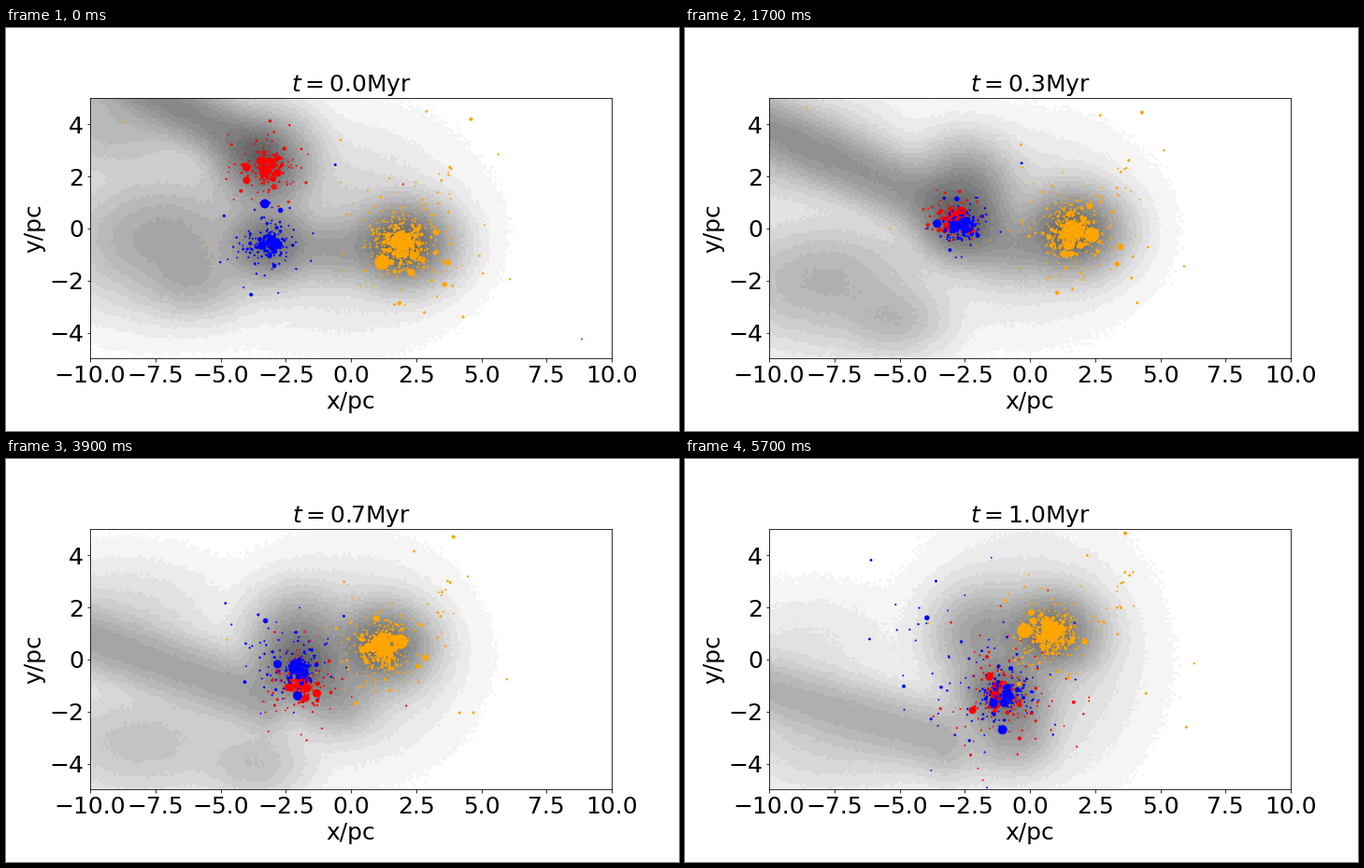
These frames come from a looping animation (720x432 px, 5.8 s). A matplotlib script:

```python
import numpy as np
import matplotlib.pyplot as plt
from matplotlib.animation import FuncAnimation

FRAMES = 58
rng = np.random.default_rng(12)

plt.rcParams.update({"font.family": "DejaVu Sans", "font.size": 25,
                     "axes.titlesize": 25})


def mix(a, b, u):
    return a + (b - a) * u


def path(u, start, *rest):
    """Straight line, or a parabola through start, middle and end."""
    a, b = np.array(start, float), np.array(rest[-1], float)
    p = mix(a, b, u)
    if len(rest) == 2:
        p = p + 4 * u * (1 - u) * (np.array(rest[0]) - (a + b) / 2)
    return p


# Cluster centres: two on a decaying mutual orbit, one drifting by itself
def pair(u, side):
    swing, angle = 1.45 * np.exp(-2.5 * u), 4.76 * u
    x = -3.15 + u + 1.15 * u * u - side * .35 * swing * np.sin(angle)
    y = .85 - 2.15 * u + side * swing * np.cos(angle)
    return np.array([x, y])


def north(u):
    return pair(u, 1)


def south(u):
    return pair(u, -1)


def east(u):
    return path(u, (2, -.6), (.8, 1))


# Gas: Gaussian clouds plus one long arm, joined by a soft maximum
GX, GY = np.meshgrid(np.linspace(-9.95, 9.95, 200), np.linspace(-4.95, 4.95, 100))


def cloud(centre, width, depth):
    x, y = centre
    return depth * np.exp(-((GX - x) / width[0]) ** 2 / 2 - ((GY - y) / width[1]) ** 2 / 2)


def arm(u):
    left = 6.6 - 10 * u + 2.2 * u * u
    right = 3.2 - 7.5 * u + 1.4 * u * u
    ridge = mix(left, right, (GX + 10) / 6)
    taper = np.maximum(GX + 3.5, 0)
    return mix(.76, .52, u) * np.exp(-((GY - ridge) / 1.25) ** 2 / 2 - taper ** 2 / 2)


def gas_image(f):
    u = f / (FRAMES - 1)
    parts = [
        arm(u),
        cloud(east(u), (1.6, 1.35), mix(1, .9, u)),
        cloud(south(u), (1.45, 1.25), .9),
        cloud(path(u, (-3.3, 2.5), (-2.2, .9), (-1.8, .9)), (1.65, 1.6), mix(.88, .64, u)),
        cloud(path(u, (-.6, -.8), (-.6, -1), (-.5, -2.7)), path(u, (1.8, 1.1), (1.3, 1.3)), .6),
        cloud(path(u, (-.4, 0), (0, 0)), path(u, (3.4, 2.8), (3.1, 2.6), (3, 3.4)), .35),
        cloud(path(u, (-7.2, -.4), (-8, -2.8), (-7.5, -3.2)),
              path(u, (3.2, 2.1), (3.6, 1.7)), mix(.6, .32, u)),
        cloud(path(u, (-6, -2), (-4.5, -4), (-2, -3.2)), (1.8, 1.2), mix(.5, .4, u)),
        cloud(path(u, (-9, 4), (-8.5, .5)), (3, 1.8), mix(.48, .2, u)),
    ]
    depth = np.cbrt(sum(p ** 3 for p in parts))
    noise = np.random.default_rng(100 + f).normal(0, .005, GX.shape)
    return 255 - 10 * np.clip(np.floor((depth + noise) * 16), 0, 16)


class Cluster:
    """Stars orbiting a moving centre; some are flung out after the encounter."""

    def __init__(self, color, count, scale, centre, breathe, kick=(0, 0), flung=0):
        self.color, self.centre, self.breathe = color, centre, breathe
        r = scale / np.sqrt(rng.uniform(.01, .95, count) ** (-2 / 3) - 1)
        size = np.clip(1.8 * rng.uniform(.002, 1, count) ** -.33, 0, 9)
        self.r = r * np.where(size > 5, .5, 1)
        self.phase, self.tilt = rng.uniform(0, 2 * np.pi, (2, count))
        self.flat = rng.uniform(.35, 1, count)
        self.rate = 3.4 / (self.r + .3) * rng.choice([-1, 1], count)
        loose = (rng.random(count) < flung) & (size < 4)
        self.kick = (rng.normal(0, 1.7, (count, 2)) + kick) * loose[:, None]
        self.sizes = list(size ** 2)
        self.solo = []

    def add(self, diameter, *points):
        self.solo.append(points)
        self.sizes.append(diameter ** 2)

    def positions(self, f):
        t = f / (FRAMES - 1)
        a = self.phase + self.rate * t
        r = self.r * self.breathe(t)
        u, v = r * np.cos(a), r * self.flat * np.sin(a)
        c, s = np.cos(self.tilt), np.sin(self.tilt)
        swarm = self.centre(t) + np.column_stack([u * c - v * s, u * s + v * c])
        swarm += self.kick * max(0, (t - .35) / .65)
        return np.vstack([swarm] + [path(t, *p) for p in self.solo])


def squeeze(u):
    return 1 + .3 * u - .55 * np.sin(np.pi * u)


red = Cluster("red", 180, .5, north, squeeze, (.3, -.6), .25)
red.add(9, (-4, 2.35), (-1.6, -1), (-1.55, -.65))
red.add(8, (-4, 1.85), (-1.9, -.9), (-2.2, -1.95))
red.add(12, (-3.3, 2.2), (-2.2, -.2), (-1.3, -1.4))
red.add(2.2, (2, 1.7), (2.2, -.85), (1.8, -3.35))
red.add(2, (8.85, -4.25), (10, -9))

blue = Cluster("blue", 190, .45, south, squeeze, (-1.8, .5), .25)
blue.add(10, (-3.3, .95), (-2.5, -.7), (-1.05, -2.7))
blue.add(9, (-3.4, -.65), (-3.3, .2), (-1.4, -1.7))
blue.add(12, (-2.9, -.6), (-2.6, .1), (-.85, -1.4))
blue.add(5.5, (-2.7, .7), (-3, 1.35), (-3.95, 1.6))
blue.add(3, (-.6, 2.45), (-.25, 2.2), (-.5, .2))

orange = Cluster("orange", 450, .68, east, lambda u: 1 - .25 * np.sin(np.pi * u / 2))
orange.add(16, (1.2, -1.3), (2.4, .3), (-.2, 1.1))
orange.add(19, (1.95, -.5), (.8, 1.1))
orange.add(5.5, (3.6, -2.15), (3, -.8), (1.6, .7))
orange.add(7, (3.7, -1.3), (3.2, -.3), (2.1, .7))
orange.add(4, (4.6, 4.2), (4.1, 4.6), (3.65, 4.85))
orange.add(2.4, (6.1, -1.95), (5.9, -1.1), (6.3, -.15))
orange.add(2.4, (5.65, 2.85), (3.95, 3.35))
orange.add(2.8, (2.9, 4.5), (2.2, 4))
orange.add(2.8, (-.4, 3.4), (-.2, 2.8))
orange.add(3, (4.3, -3.4), (4.1, -2.45), (4.45, -1.3))
orange.add(3, (3.9, -2.2), (4.2, -1.9), (6, -2.6))
orange.add(2.2, (-5.5, -.6), (-5.1, .4), (-3.9, 1.4))
orange.add(2, (-8.7, 4.1), (-8.2, 5.8))
for _ in range(14):  # loose stars drifting to the upper right
    start = rng.uniform((2.6, .4), (4.2, 2.6))
    orange.add(rng.uniform(1.8, 3), start, start + rng.uniform((-.5, .2), (.3, 1.2)))

clusters = [red, blue, orange]

fig, ax = plt.subplots(figsize=(10, 6), dpi=72)
fig.subplots_adjust(left=.125, right=.9, bottom=.125, top=.88)
gas = ax.imshow(gas_image(0), extent=(-10, 10, -5, 5), origin="lower",
                cmap="gray", vmin=0, vmax=255, interpolation="nearest")
dots = [ax.scatter(*c.positions(0).T, s=c.sizes, c=c.color, linewidths=0, zorder=2)
        for c in clusters]
ax.set(xlim=(-10, 10), ylim=(-5, 5), xlabel="x/pc", ylabel="y/pc",
       xticks=np.arange(-10, 10.1, 2.5), yticks=range(-4, 5, 2))
title = ax.set_title("")


def draw(f):
    gas.set_data(gas_image(f))
    for dot, cluster in zip(dots, clusters):
        dot.set_offsets(cluster.positions(f))
    title.set_text(f"$t={f / (FRAMES - 1):.1f}$Myr")
    return [gas, title, *dots]


anim = FuncAnimation(fig, draw, frames=FRAMES, interval=100, repeat=True)
plt.show()
```
